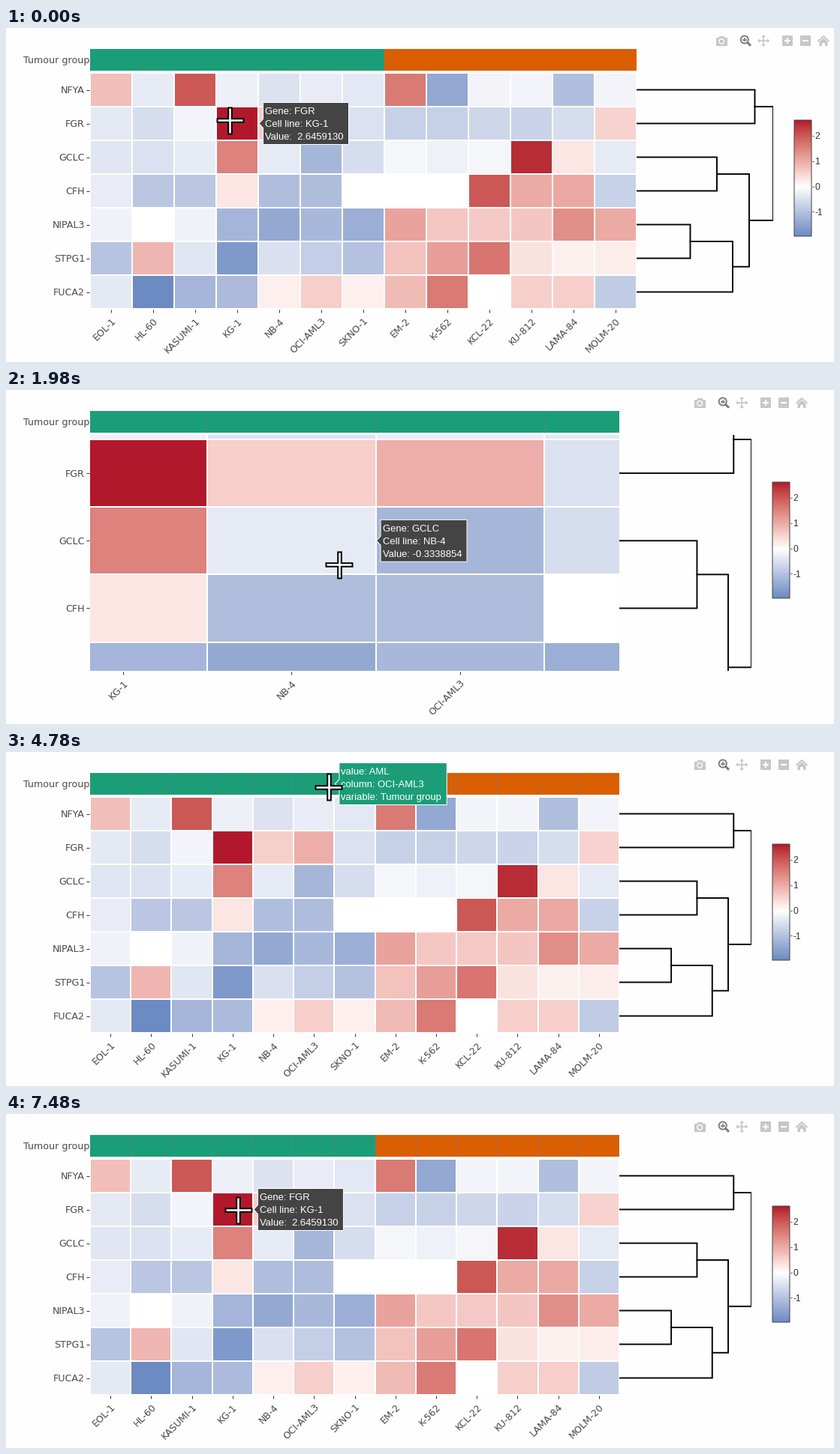
A matplotlib script for the animation above (7.69 s loop, 1103x446 px).

```python
import numpy as np
import matplotlib.pyplot as plt
from matplotlib.animation import FuncAnimation
from matplotlib.collections import LineCollection, PolyCollection
from matplotlib.lines import Line2D
from matplotlib.patches import Circle, PathPatch, Polygon, Rectangle
from matplotlib.path import Path
from matplotlib.transforms import Affine2D, Bbox, TransformedBbox

W, H, DPI = 1103, 446, 64
PX = 72 / DPI                      # points per pixel
LOOP, FRAMES = 7690, 384
STEP = LOOP / FRAMES
LEFT, TOP, BOTTOM = 112, 60, 375   # heatmap panel
BAR = (28, 57)                     # annotation strip
GREEN, ORANGE, SEAM = "#1b9e77", "#d95f02", "#7570b3"
INK, DARK = "#4a4a4a", "#444444"

GENES = ["NFYA", "FGR", "GCLC", "CFH", "NIPAL3", "STPG1", "FUCA2"]
LINES = ["EOL-1", "HL-60", "KASUMI-1", "KG-1", "NB-4", "OCI-AML3", "SKNO-1",
         "EM-2", "K-562", "KCL-22", "KU-812", "LAMA-84", "MOLM-20"]
ROWS, COLS, N_GREEN = len(GENES), len(LINES), 7

# Mean expression of each gene in the two tumour groups, and the cells that stand out
GREEN_MEAN = [-.3, -.4, -.4, -1, -1.3, -1, -1.1]
ORANGE_MEAN = [-.2, -.7, -.25, 1.1, .6, .25, .75]
STANDOUT = {
    "NFYA": {"EOL-1": .8, "KASUMI-1": 2.05, "EM-2": 1.65, "K-562": -1.45, "LAMA-84": -1.05},
    "FGR": {"KG-1": 2.645913, "NB-4": .6, "OCI-AML3": .9939864, "MOLM-20": .55},
    "GCLC": {"KG-1": 1.55, "NB-4": -.3338854, "OCI-AML3": -1.2, "KU-812": 2.5, "LAMA-84": .3},
    "CFH": {"EOL-1": -.3, "KG-1": .3, "SKNO-1": 0, "EM-2": 0, "K-562": 0, "KCL-22": 2.05,
            "MOLM-20": -.75},
    "NIPAL3": {"EOL-1": -.2, "HL-60": 0, "KASUMI-1": -.2, "EM-2": 1.15, "LAMA-84": 1.4,
               "MOLM-20": 1.05},
    "STPG1": {"HL-60": .9, "KASUMI-1": -.4, "KG-1": -1.7, "NB-4": -.5, "EM-2": .75,
              "K-562": 1.2, "KCL-22": 1.7},
    "FUCA2": {"EOL-1": -.35, "HL-60": -1.95, "NB-4": .2, "OCI-AML3": .6, "SKNO-1": .2,
              "K-562": 1.65, "KCL-22": 0, "MOLM-20": -.85}}
VMAX, VMIN = 2.645913, -1.95

values = np.where(np.arange(COLS) < N_GREEN, np.c_[GREEN_MEAN], np.c_[ORANGE_MEAN])
values = values + np.random.default_rng(4).normal(0, .1, values.shape)
for gene, cells_of in STANDOUT.items():
    for name, v in cells_of.items():
        values[GENES.index(gene), LINES.index(name)] = v

# Diverging colours, blended with white in Lab space
XYZ = np.array([[.4124, .3576, .1805], [.2126, .7152, .0722], [.0193, .1192, .9505]])
WHITE = XYZ.sum(axis=1)


def to_lab(rgb):
    c = np.array(rgb) / 255
    lin = np.where(c > .04045, ((c + .055) / 1.055) ** 2.4, c / 12.92)
    f = np.cbrt(XYZ @ lin / WHITE)
    return np.array([116 * f[1] - 16, 500 * (f[0] - f[1]), 200 * (f[1] - f[2])])


def to_rgb(lab):
    fy = (lab[0] + 16) / 116
    f = np.array([fy + lab[1] / 500, fy, fy - lab[2] / 200])
    xyz = np.where(f > 6 / 29, f ** 3, (f - 4 / 29) * 0.12842) * WHITE
    lin = np.clip(np.linalg.solve(XYZ, xyz), 0, 1)
    return np.where(lin > .0031308, 1.055 * lin ** (1 / 2.4) - .055, 12.92 * lin)


PAPER = to_lab((255, 255, 255))
RED, BLUE = to_lab((178, 24, 43)), to_lab((33, 102, 172))


def shade(v):
    end = RED if v > 0 else BLUE
    return to_rgb(PAPER + (end - PAPER) * min(abs(v) / VMAX, 1))


# Dendrogram merges (node, node, height); leaves come first, each merge adds a node
MERGES = [(4, 5, 71.5), (2, 3, 107), (7, 6, 128), (8, 9, 150), (0, 1, 157.5), (11, 10, 182)]

# Pointer moves (start, end, x, y); it rests in between
HOME, START, END = (298, 123), (297, 102), (473, 259.2)
DRAG, RELEASE, ZOOMED, RESET = 460, 1220, 1440, 3440
CLICKS = [(DRAG, RELEASE), (3060, 3160), (3210, 3300)]
MOVES = [(30, 210, *START), (DRAG, 600, 311, 134), (600, RELEASE, *END),
         (1480, 2420, 416.5, 209), (3480, 3890, 387, 92), (3890, 4290, 368, 45),
         (4570, 5090, 528, 50), (5990, 6350, 275, 118), (6350, 6640, 309, 128)]


def pointer(t):
    x, y = HOME
    for t0, t1, x1, y1 in MOVES:
        p = np.clip((t - t0) / (t1 - t0), 0, 1)
        x, y = x + p * (x1 - x), y + p * (y1 - y)
    return x, y


def view(cols, rows, right):
    """First column x, column width, first row y, row height, right edge."""
    w = (right - LEFT) / (cols[1] - cols[0])
    h = (BOTTOM - TOP) / (rows[1] - rows[0])
    return LEFT - cols[0] * w, w, TOP - rows[0] * h, h, right


FULL = view((0, COLS), (0, ROWS), 840)
ZOOM = view([(p[0] - LEFT) / FULL[1] for p in (START, END)],
            [(p[1] - TOP) / FULL[3] for p in (START, END)], 817)
FINAL = view((0, COLS), (0, ROWS), 817)


fig = plt.figure(figsize=(W / DPI, H / DPI), dpi=DPI, facecolor="#fefefe")
ax = fig.add_axes([0, 0, 1, 1])
ax.set_axis_off()
shift = Affine2D()
moved = shift + ax.transData


def text(x, y, s, size=12.6, font="DejaVu Sans", color=INK, **kw):
    return ax.text(x, y, s, fontsize=size * PX, family=font, color=color, **kw)


def line(xs, ys, width, color, **kw):
    return ax.add_line(Line2D(xs, ys, lw=width * PX, color=color,
                              solid_capstyle="butt", **kw))


def lines(color, width, **kw):
    return ax.add_collection(LineCollection([], colors=color, linewidths=width * PX,
                                            zorder=2, **kw))


def box(x0, y0, x1, y1):
    return [(x0, y0), (x1, y0), (x1, y1), (x0, y1)]


def area(polys):
    return Path.make_compound_path(*[Path(list(p) + [p[0]], closed=True) for p in polys])


UNIT = box(0, 0, 1, 1)

# Heatmap, strip and dendrogram
cells = ax.add_collection(PolyCollection(
    [UNIT], facecolors=[shade(v) for v in values.flat], edgecolors="white",
    linewidths=2 * PX, zorder=1))
strips = [ax.add_patch(Rectangle((0, BAR[0]), 1, BAR[1] - BAR[0], color=c, lw=0, zorder=1))
          for c in (GREEN, ORANGE)]
seams = lines(SEAM, .9, alpha=.5)
tree = lines("black", 1.9, capstyle="projecting", joinstyle="miter", snap=False)
ticks = lines("#333333", 1)

text(111, 47, "Tumour group", ha="right")
row_names = [text(105, 0, g, ha="right") for g in GENES]
col_names = [text(0, 392, c, ha="right", va="baseline", rotation=45,
                  rotation_mode="anchor") for c in LINES]
line([0, W], [445.5, 445.5], 1, "#f3f3f3")

# Colour bar
ramp = np.array([[shade(v)] for v in np.linspace(VMAX, VMIN, 155)])
scale = ax.imshow(ramp, aspect="auto", zorder=1)
ax.add_patch(Rectangle((1050, 123), 23, 155, fill=False, ec=DARK, lw=PX, zorder=2,
                       transform=moved, snap=False))
for v in range(-1, 3):
    y = 211.5 - 33.8 * v
    line([1074, 1076], [y, y], 1, DARK, transform=moved)
    text(1077.5, y + 4.3, str(v), 12, "Liberation Sans", "#333333", transform=moved)

ax.set_xlim(0, W)
ax.set_ylim(H, 0)

# Toolbar
icons = []


def icon_patch(patch, grey=.78):
    patch.set(transform=moved, linewidth=0, zorder=3)
    icons.append((ax.add_patch(patch), grey))


def icon_line(xs, ys, width, grey=.78):
    icons.append((line(xs, ys, width, "white", transform=moved, zorder=3), grey))


def icon_plus(x, y, r, width, grey=.78, upright=True):
    icon_line([x - r, x + r], [y, y], width, grey)
    if upright:
        icon_line([x, x], [y - r, y + r], width, grey)


def icon_ring(x, y, radii, greys):
    for r, grey in zip(radii, greys):
        icon_patch(Circle((x, y), r), grey)


icon_patch(Rectangle((945.5, 12.5), 15.5, 11))
icon_patch(Rectangle((950, 10.5), 6.5, 3))
icon_ring(953.2, 17.8, (4, 2.6), (1, .78))
icon_ring(983.8, 15.5, (6, 4.1), (.48, 1))
icon_line([987.5, 992], [19.2, 23.7], 3, .48)
icon_plus(983.8, 15.5, 2.8, 1.6, .48)
icon_plus(1009.2, 17, 7, 1.7)
for turn in range(4):
    u = np.array([np.cos(turn * np.pi / 2), np.sin(turn * np.pi / 2)])
    side = 3 * u[::-1] * (1, -1)
    icon_patch(Polygon(np.array([8 * u, 5 * u + side, 5 * u - side]) + (1009.2, 17)))
for cx in (1041, 1065):
    icon_patch(Rectangle((cx - 7, 10), 14, 14))
    icon_plus(cx, 17, 4, 2.2, 1, upright=cx == 1041)
icon_line([1081.5, 1089, 1096.5], [18, 11, 18], 2)
icon_patch(Polygon([(1083.5, 24), (1083.5, 18.5), (1089, 13.5), (1094.5, 18.5), (1094.5, 24)]))
icon_patch(Rectangle((1087.3, 19.5), 3.4, 4.5), 1)

# Zoom selection, tooltip and pointer
dim = ax.add_patch(PathPatch(area([UNIT]), fc="black", lw=0, zorder=4))
corners = ax.add_patch(PathPatch(area([UNIT]), fc="white", ec=DARK, lw=PX, zorder=5))
bubble = ax.add_patch(Polygon(UNIT, ec="white", lw=PX, zorder=6))
tip_lines = [text(0, 0, "", 13, "Liberation Sans", "white", zorder=7) for _ in range(3)]
halo = ax.add_patch(Circle((0, 0), 30, fc=(.835, .663, .016), alpha=.75, lw=0, zorder=8))
outline = [line([], [], 6.6, "k", zorder=9) for _ in "xy"]
core = [line([], [], 2.6, "w", zorder=10) for _ in "xy"]

shown = {"view": None}


def clip(artist, x0, x1):
    artist.set_clip_box(TransformedBbox(Bbox.from_extents(x0, BOTTOM, x1, TOP), ax.transData))


def dendrogram(x, k, y0, h):
    nodes = [(x, y0 + h * (r + .5)) for r in range(ROWS)]
    links = []
    for a, b, height in MERGES:
        (xa, ya), (xb, yb), xj = nodes[a], nodes[b], x + k * height
        links.append([(xa, ya), (xj, ya), (xj, yb), (xb, yb)])
        nodes.append((xj, (ya + yb) / 2))
    return links


def apply_view(now):
    if shown["view"] is now:
        return
    shown["view"] = now
    x0, w, y0, h, right = now
    dx = 0 if now is FULL else -29
    shift.clear().translate(dx, 0)
    scale.set_extent((1050 + dx, 1073 + dx, 278, 123))
    cells.set_verts([box(x0 + w * c, y0 + h * r, x0 + w * (c + 1), y0 + h * (r + 1))
                     for r in range(ROWS) for c in range(COLS)])
    clip(cells, LEFT, right)

    split = min(x0 + w * N_GREEN, right)
    strips[0].set(x=LEFT, width=split - LEFT)
    strips[1].set(x=split, width=right - split)
    edges = [x0 + w * c for c in range(1, COLS)]
    seams.set_segments([[(x, y) for y in BAR] for x in edges if LEFT < x < right])
    seams.set_visible(now is not FULL)

    k = 1 if now is FULL else 176 / 182
    tree.set_segments(dendrogram(right, k, y0, h))
    clip(tree, right, right + k * 182)

    marks = []
    for r, label in enumerate(row_names):
        y = y0 + h * (r + .5)
        label.set(y=y + 4.6, visible=TOP < y < BOTTOM)
        if TOP < y < BOTTOM:
            marks.append([(107, y), (111, y)])
    for c, label in enumerate(col_names):
        x = x0 + w * (c + .5)
        label.set(x=x + 7, visible=LEFT < x < right)
        if LEFT < x < right:
            marks.append([(x, 376), (x, 380)])
    ticks.set_segments(marks)


def show_selection(t):
    (l, top), (x1, y1) = START, pointer(t - 70)
    dx, dy = x1 - l, y1 - top
    on = DRAG < t < ZOOMED and dy >= 8
    dim.set_visible(on)
    corners.set_visible(on)
    if not on:
        return
    grow = np.interp(t, [490, 640], [0, 1])
    dim.set_alpha(.4 * grow)
    corners.set_alpha(grow)
    if dx < min(.6 * dy, 20):      # still a vertical-only zoom
        hole = box(LEFT, top, 840, y1)
        marks = [box(l - 20.5, y - 1.5, l + 20.5, y + 1.5) for y in (top - 2, y1 + 2)]
    else:
        hole = box(l, top, x1, y1)
        n = min(dx, dy, 20) // 2 - .5
        ell = [(3.5, -n), (.5, -n), (.5, .5), (-n, .5), (-n, 3.5), (3.5, 3.5)]
        marks = [[(x + sx * a, y + sy * b) for a, b in ell]
                 for x, sx in ((l, -1), (x1, 1)) for y, sy in ((top, -1), (y1, 1))]
    dim.set_path(area([box(LEFT, TOP, 840, BOTTOM), hole[::-1]]))
    corners.set_path(area(marks))


def hover(t, now):
    """Lines, colour, tail x and centre y of the tooltip, or None."""
    if DRAG <= t < 1600 or RESET <= t < RESET + 100:
        return None
    x, y = pointer(t - 80)
    x0, w, y0, h, right = now
    c = int((x - x0) // w)
    tail = min(x0 + w * (c + 1), right)
    if BAR[0] <= y < BAR[1]:
        group, color = ("AML", GREEN) if c < N_GREEN else ("CML_myelo_BC", ORANGE)
        words = ["value: " + group, "column: " + LINES[c], "variable: Tumour group"]
        return words, color, tail, sum(BAR) / 2
    if TOP <= y < BOTTOM:
        r = int((y - y0) // h)
        words = ["Gene: " + GENES[r], "Cell line: " + LINES[c],
                 f"Value: {values[r, c]:10.7f}"]
        return words, DARK, tail, y0 + h * (r + .5)
    return None


def show_tooltip(t, now):
    info = hover(t, now)
    for artist in [bubble] + tip_lines:
        artist.set_visible(info is not None)
    if info is None:
        return
    words, color, tail, mid = info
    for i, (label, s) in enumerate(zip(tip_lines, words)):
        label.set(text=s, position=(tail + 9, mid - 12.5 + 17 * i))
    x0 = tail + 6.5
    x1 = tail + 16 + max(label.get_window_extent().width for label in tip_lines)
    bubble.set_xy([(tail + 1, mid), (x0, mid - 6)] + box(x0, mid - 28, x1, mid + 28)
                  + [(x0, mid + 6)])
    bubble.set_facecolor(color)


def show_pointer(t):
    x, y = pointer(t)
    pressed = any(a <= t < b for a, b in CLICKS)
    halo.set(center=(x, y), visible=pressed)
    dark, light = ("#6b5600", "#fbf3c4") if pressed else ("black", "white")
    for (across, down), r, color in ((outline, 18.5, dark), (core, 16.5, light)):
        across.set(data=([x - r, x + r], [y, y]), color=color)
        down.set(data=([x, x], [y - r, y + r]), color=color)


def show_toolbar(t):
    # Fades out for the drag and dips during the double click
    a = np.interp(t, [480, 690, 1560, 1860, 3060, 3300, 3700], [1, 0, 0, 1, 1, .7, 1])
    for artist, grey in icons:
        artist.set_color((1 - (1 - grey) * a,) * 3)


def draw(i):
    t = i * STEP + 5
    now = FULL if t < ZOOMED else ZOOM if t < RESET else FINAL
    apply_view(now)
    show_toolbar(t)
    show_selection(t)
    show_tooltip(t, now)
    show_pointer(t)
    return []


anim = FuncAnimation(fig, draw, frames=FRAMES, interval=STEP, repeat=True,
                     repeat_delay=0, blit=False)
plt.show()
```
